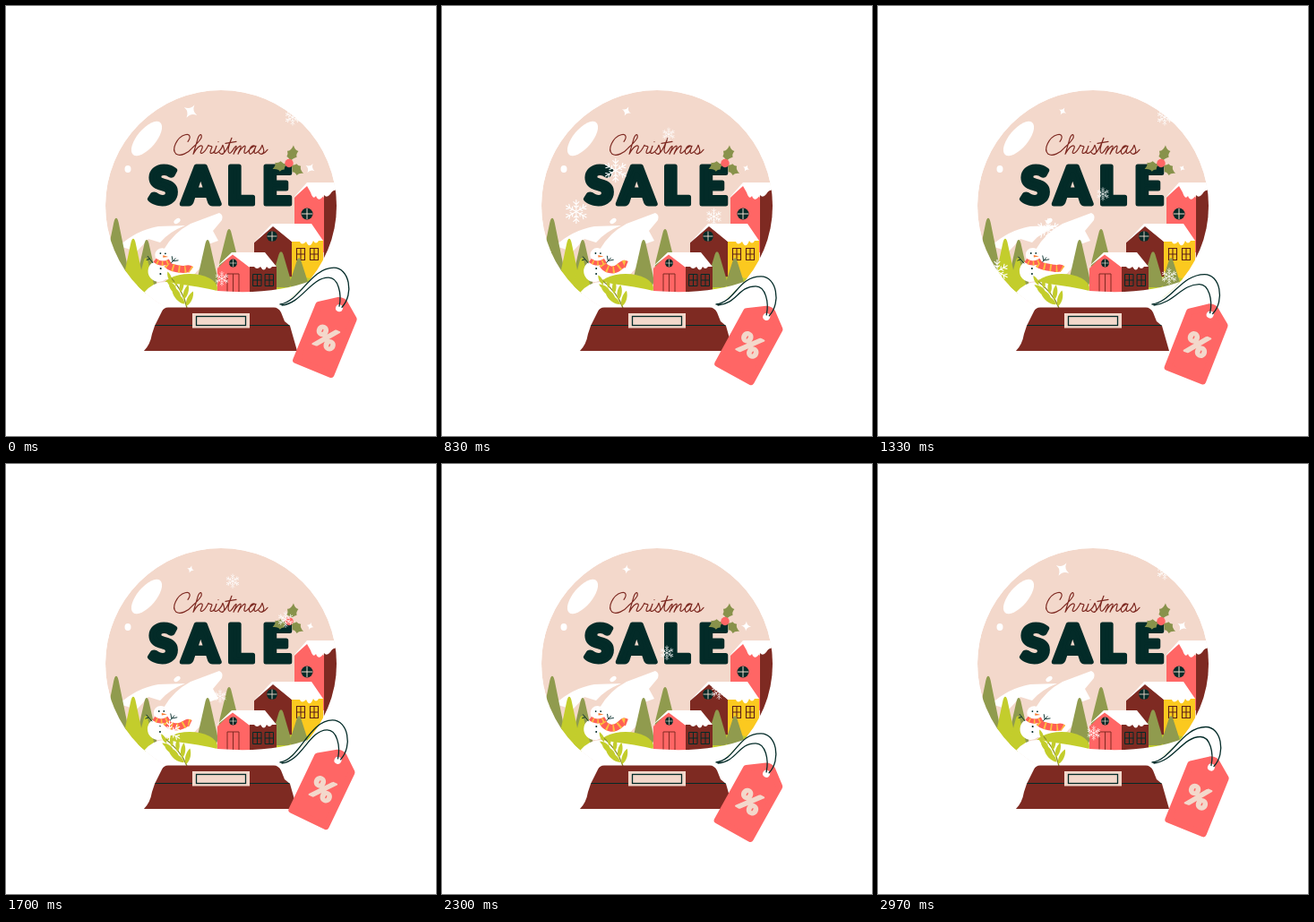
Animation of 480 by 480 pixels, one loop 3000 ms. Source, as an HTML page:

```html
<!DOCTYPE html>
<html lang="en">
<head>
<meta charset="utf-8">
<title>Christmas sale</title>
<style>
  html, body { margin: 0; width: 100%; height: 100%; overflow: hidden; background: #fff; }
  svg { display: block; width: 100%; height: 100%; }
  text { font-family: Lato, "Open Sans", sans-serif; font-weight: 900; }
  .pink { fill: #f3d8cb; } .white { fill: #fff; }
  .red { fill: #ff6665; } .brown { fill: #7e2a22; } .yellow { fill: #fbc91f; }
  .olive { fill: #909b4e; } .lime { fill: #c3cd2c; } .dark { fill: #032b28; }
  .line { fill: none; stroke: #032b28; stroke-linecap: round; }
  .pane { fill: none; stroke: #5b1f18; stroke-width: 1.1; }
</style>
</head>
<body>
<svg viewBox="0 0 480 480">
  <defs>
    <clipPath id="globe"><circle cx="240" cy="223" r="129"/></clipPath>
    <path id="star" d="M0,-8.5 Q1,-1 8.5,0 Q1,1 0,8.5 Q-1,1 -8.5,0 Q-1,-1 0,-8.5Z" class="white"/>
    <path id="arm" d="M0,0V-13M-3,-11L0,-8L3,-11M-2.5,-6.5L0,-4.5L2.5,-6.500"/>
    <g id="flake" fill="none" stroke="#fff" stroke-width="1.1" stroke-linecap="round"></g>
    <path id="tree" d="M0,-1Q1.500,-1 2.500,3L10.500,35Q13,46 7,46H-7Q-13,46 -10.500,35L-2.500,3Q-1.500,-1 0,-1Z"/>
    <path id="hollyLeaf" d="M0,0Q-1,-4 -5,-5Q-4,-8 -6,-11Q-2,-12 -1,-19Q2,-14 6,-14Q4,-10 6,-7Q2,-5 0,0Z" fill="#88924b"/>
    <path id="leaf" d="M0,0C-4.500,-5 -3.500,-15 0,-20C3.500,-15 4.500,-5 0,0Z" class="lime"/>
    <path id="pane" d="M-4.500,-6.500h9v13h-9zM0,-6.500v13M-4.500,0h9"/>
    <g id="porthole"><circle r="6.500" fill="#032b28"/><path d="M-6,0H6M0,-6V6" stroke="#f3d8cb" stroke-width="1"/></g>
  </defs>

  <g clip-path="url(#globe)">
    <circle cx="240" cy="223" r="129" class="pink"/>

    <g class="white">
      <path d="M126,268Q146,250 170,246L200,245Q182,252 172,264L159,260L146,274Z"/>
      <path d="M160,305L176,272Q187,253 206,243L238,231Q243,233 241,239L231,251L237,262L223,267L219,290L205,305Z"/>
      <ellipse cx="191" cy="240" rx="4" ry="2.500" transform="rotate(-35 191 240)"/>
      <ellipse cx="157" cy="148" rx="10.500" ry="23.500" transform="rotate(40 157 148)"/>
      <ellipse cx="136" cy="182" rx="3.500" ry="4"/>
    </g>

    <use href="#tree" class="olive" transform="translate(123 238) scale(1.1 1.350)"/>
    <use href="#tree" class="olive" transform="translate(157 262) scale(1 1.100)"/>
    <use href="#tree" class="lime" transform="translate(142 261) scale(1.1 1.300)"/>
    <use href="#tree" class="lime" transform="translate(156 282) scale(.9 .850)"/>
    <use href="#tree" class="olive" transform="translate(249 250)"/>
    <use href="#tree" class="olive" transform="translate(225 262) scale(1 1.100)"/>
    <ellipse cx="205" cy="315" rx="31" ry="16" class="lime"/>

    <path class="brown" d="M355,211L372,203V310H355Z"/>
    <path class="red" d="M322,214L337,199L355,214V275H322Z"/>
    <path class="white" d="M320,215L336,197H372V207Q366,203 362,210Q358,215 355,211Q349,220 346,212Q343,217 340,208L336,201Z"/>
    <use href="#porthole" transform="translate(336 232)"/>

    <path class="brown" d="M277,264L298,245L319,263V310H277Z"/>
    <path class="yellow" d="M319,261H354V315H319Z"/>
    <path class="white" d="M275,266L297,243H341L354,262H349Q346,267 343,262Q339,272 335,263Q330,268 328,263H319L298,246Z"/>
    <use href="#porthole" transform="translate(297 257) scale(.9)"/>
    <use href="#pane" class="pane" transform="translate(329 277)"/>
    <use href="#pane" class="pane" transform="translate(344 277)"/>

    <ellipse cx="323" cy="314" rx="30" ry="12" class="lime"/>
    <use href="#tree" class="olive" transform="translate(307 275) scale(1 .850)"/>
    <use href="#tree" class="olive" transform="translate(327 282) scale(.9 .700)"/>
    <path class="red" d="M236,293L253,276L272,292V322H236Z"/>
    <path class="brown" d="M272,290H302V322H272Z"/>
    <path class="white" d="M233,293L252,275H289L302,291H297Q294,295 291,291Q288,298 284,291Q280,295 277,291H271L253,277.500Z"/>
    <use href="#porthole" transform="translate(253.500 287) scale(.68)"/>
    <path d="M247,319V299H260V319M253.500,299V319" fill="none" stroke="#7e2a22"/>
    <use href="#pane" class="line" transform="translate(280.500 306)"/>
    <use href="#pane" class="line" transform="translate(294 306)"/>
    <path class="white" d="M100,330L154,320Q168,303 190,310Q215,313 236,318Q300,323 342,306L375,286V400H100Z"/>
  </g>

  <g id="snowman">
    <circle cx="170" cy="296" r="12" class="white"/>
    <circle cx="173" cy="278" r="8" class="white"/>
    <path class="line" d="M181,289L188,281M185,284L184,279M186,284L191,283M163,287L157,280M159,283L156,284" stroke-width=".9"/>
    <path id="tail" fill="none" stroke="#ff5f55" stroke-width="8"/>
    <path id="tailStripes" fill="none" stroke="#fbc040" stroke-width="8" stroke-dasharray="1.8 5"/>
    <path d="M165,284Q173,290 182,284" fill="none" stroke="#ff5f55" stroke-width="5"/>
    <path d="M165,284Q173,290 182,284" fill="none" stroke="#fbc040" stroke-width="5" stroke-dasharray="1.6 4" stroke-dashoffset="-3"/>
    <circle cx="171" cy="276" r=".9" class="dark"/><circle cx="176.500" cy="276" r=".9" class="dark"/>
    <path d="M174,278L180,279.500L174,280.500Z" fill="#f9792e"/>
    <circle cx="172" cy="293" r="1" class="dark"/><circle cx="172" cy="299" r="1" class="dark"/>
  </g>

  <path role="img" aria-label="Christmas" transform="translate(0 -.7)" fill="none" stroke="#7e2a22" stroke-width="1.200" stroke-linecap="round" stroke-linejoin="round"
    d="M203,152C207,147 205,143 200,144.500C191,147 184,161 190,166C195,169 203,165 208,159Q215,153 218,148C219,143 216,143 214,149L209,166
       C212,160 217,155 219,157C221,159 214,166 219,165C222,164 224,160 226,156C226,158 230,156 230,158C229,161 226,166 230,165
       C233,164 234,160 235,157C233,162 231,166 235,165C239,163 241,159 242,156C243,159 246,165 241,166Q239,166 238,164
       M242,166C246,163 249,156 252,148C249,155 246,165 250,165C253,164 255,157 257,157C258,158 255,163 254,166
       C257,160 261,156 262,157C263,158 260,163 259,166C262,160 266,156 267,157C268,159 264,165 267,165
       C270,165 273,157 278,157C273,155 269,165 273,166C276,165 278,160 279,157C277,162 276,166 279,165
       C283,163 285,159 286,156C287,159 290,165 285,166Q283,166 282,164M286,166Q289,165 292,161M245,154L257,152M237,152.200v.1"/>
  <text x="159.500 197 246.500 286" y="221" font-size="57" class="dark" stroke="#032b28" stroke-width="5" stroke-linejoin="round">SALE</text>

  <use href="#hollyLeaf" transform="translate(317 174) rotate(15)"/>
  <use href="#hollyLeaf" transform="translate(314 177) rotate(-104) scale(.9)"/>
  <use href="#hollyLeaf" transform="translate(318 177) rotate(128) scale(.9)"/>
  <circle cx="316" cy="175.500" r="4.700" class="red"/>

  <use id="starLeft" href="#star"/>
  <use id="starRight" href="#star"/>
  <g id="snow"></g>

  <g id="sprig">
    <path d="M202,337Q195,318 176,304" fill="none" stroke="#8a8f2a" stroke-width="1.300"/>
    <g id="leaves"></g>
  </g>

  <path class="brown" d="M166,357L174,341Q176,336.500 181,336.500H299Q304,336.500 307,342L311,352L317,357L325,385H154Q161,378 163,366Z"/>
  <path class="line" d="M167,356.500H316" stroke-width="1.200"/>
  <rect x="208" y="343" width="64" height="16.500" class="pink"/>
  <rect x="212.500" y="346.500" width="55" height="10" class="line" stroke-width="1.300"/>

  <g id="tag">
    <path d="M-22.500,5.500L-4,-7.500Q-.5,-9 3,-7.500L19.500,5.500V72H-22.500Z" class="red" stroke="#ff6665" stroke-width="7.500" stroke-linejoin="round"/>
    <circle r="4" class="white"/>
    <text x="-1" y="48" font-size="32" text-anchor="middle" class="pink" stroke="#f3d8cb" stroke-width="2" stroke-linejoin="round">%</text>
  </g>
  <path id="strings" class="line" stroke-width="1.300"/>
</svg>
<script>
const LOOP = 3000, SWING = 1500, FALL = 0.1335, TOP = 80;
const $ = id => document.getElementById(id);
const set = (el, value, name = "transform") => el.setAttribute(name, value);

function add(parent, href, transform) {
  const el = document.createElementNS("http://www.w3.org/2000/svg", "use");
  set(el, href, "href");
  if (transform) set(el, transform);
  return parent.appendChild(el);
}

// Smooth value through [position, value] waypoints, held at both ends.
function along(points, p) {
  if (p <= points[0][0]) return points[0][1];
  for (let i = 1; i < points.length; i++) {
    const [a, va] = points[i - 1], [b, vb] = points[i];
    if (p <= b) return va + (vb - va) * (1 - Math.cos(Math.PI * (p - a) / (b - a))) / 2;
  }
  return points[points.length - 1][1];
}
const wave = (t, peak, period = SWING) => Math.cos(2 * Math.PI * (t - peak) / period);

for (let i = 0; i < 6; i++) add($("flake"), "#arm", `rotate(${i * 60})`);

for (const [x, y, angle, scale] of [
  [180, 311, -28, .6], [186, 315, -4, .6], [192, 321, 2, .75], [197, 328, 8, .85],
  [201, 335, 16, .9], [187, 318, -58, .7], [193, 325, -56, .9], [199, 333, -54, 1]
]) add($("leaves"), "#leaf", `translate(${x} ${y}) rotate(${angle}) scale(${scale})`);

// Horizontal drift by height.
const drift = {
  left: [[120, 140], [168, 144], [225, 150], [296, 133]],
  inner: [[122, 175], [200, 196], [246, 190], [310, 182]],
  middle: [[143, 253], [175, 255], [211, 251], [260, 239], [310, 241]],
  right: [[124, 320], [228, 303], [300, 325]]
};
const flakes = [
  [drift.inner, 55, 1], [drift.left, -289, 1], [drift.middle, 358, .55],
  [drift.middle, 1321, .6], [drift.right, -330, .68], [drift.right, 1000, .68]
].map(([path, start, scale]) => ({ path, start, scale, el: add($("snow"), "#flake") }));

const starLeftSize = [[0, 1], [370, 1], [830, .65], [1330, .55], [2070, .45], [2570, .8], [3000, 1]];
const starRightSize = [[0, .7], [370, .5], [1330, .42], [2070, .55], [2570, .8], [3000, .7]];
const starTurn = [[0, 32], [370, 5], [830, 25], [1330, 30], [2070, 8], [2570, 0], [3000, 32]];
const sprigTurn = [[0, 9], [250, 9], [830, 0], [1600, -2], [2070, 0], [2570, 5], [3000, 9]];

function draw(t) {
  for (const { path, start, scale, el } of flakes) {
    const y = TOP + FALL * ((t - start + LOOP) % LOOP);
    set(el, `translate(${along(path, y)} ${y}) scale(${scale})`);
  }

  const turn = along(starTurn, t);
  set($("starLeft"), `translate(206 117.500) rotate(${turn}) scale(${along(starLeftSize, t)})`);
  set($("starRight"), `translate(339.500 181) rotate(${turn}) scale(${along(starRightSize, t)})`);
  set($("sprig"), `rotate(${along(sprigTurn, t)} 202 337)`);

  set($("snowman"), `rotate(${1 + 1.5 * wave(t, 0, LOOP)} 170 308)`);
  const flap = wave(t, 570);
  const tail = `M179,288C182,${293 + 2 * flap} 191,${295 + 3 * flap} 197,${292 - flap}S202,${288 - 3 * flap} 206,${290 - 4 * flap}`;
  set($("tail"), tail, "d");
  set($("tailStripes"), tail, "d");

  const x = 367 + 5 * wave(t, 10), y = 340.5 - 10.5 * wave(t, 300);
  set($("tag"), `translate(${x} ${y}) rotate(${26 + 4.6 * wave(t, 600)})`);
  set($("strings"),
    `M306,333C328,330 ${x - 32},${y - 45} ${x - 6},${y - 45}C${x + 11},${y - 45} ${x + 17},${y - 16} ${x + 3},${y - 1}` +
    `M308,334C330,332 ${x - 32},${y - 34} ${x - 12},${y - 34}C${x - 1},${y - 34} ${x + 3},${y - 16} ${x},${y - 2}`, "d");
}

const began = performance.now();
function tick() {
  draw((performance.now() - began) % LOOP);
  requestAnimationFrame(tick);
}
tick();
</script>
</body>
</html>
```
